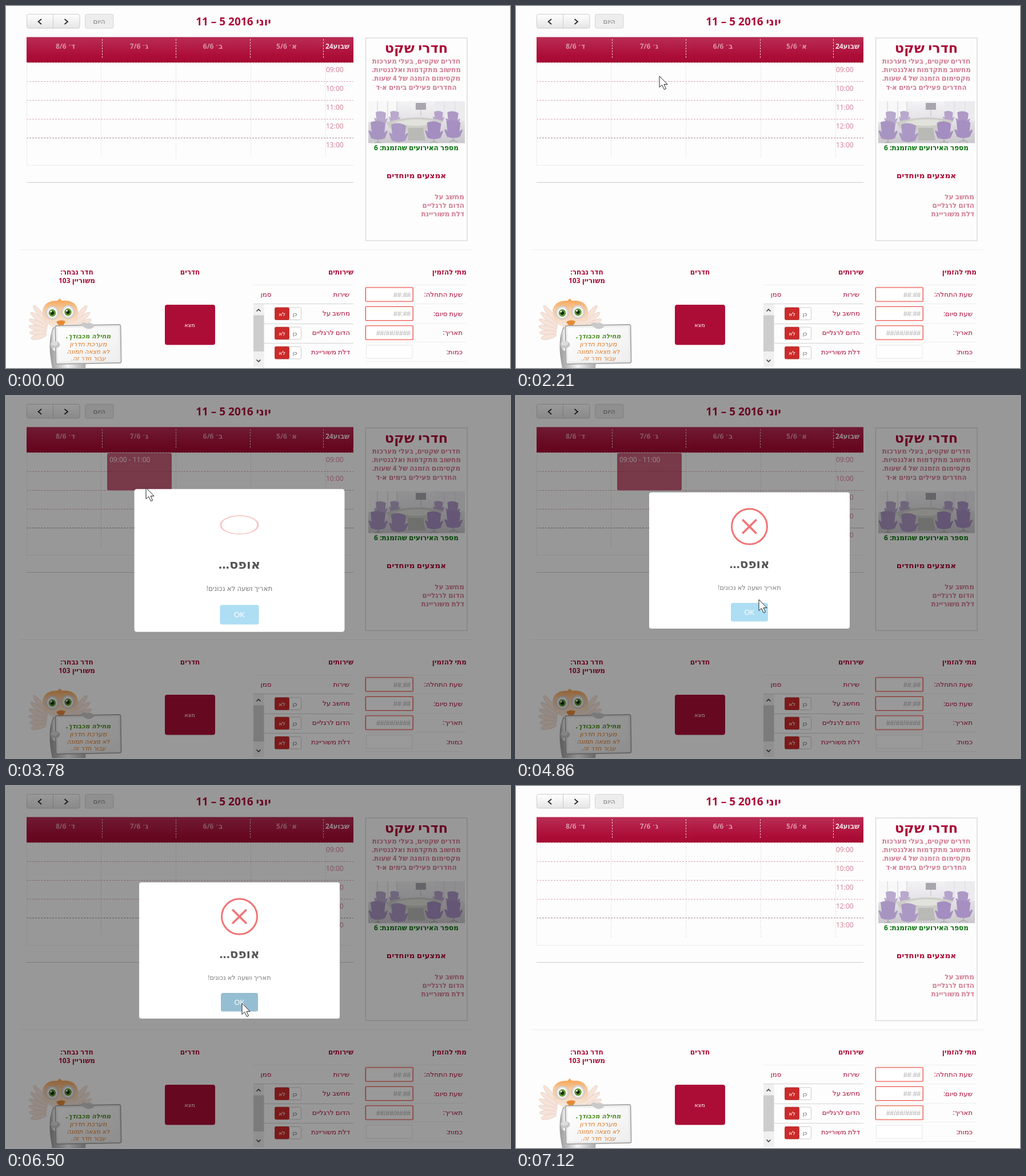
An HTML page for the animation above (8450 ms loop, 882 by 635 pixels).

```html
<!DOCTYPE html>
<html lang="he">
<head>
<meta charset="utf-8">
<title>הזמנת חדרים</title>
<style>
  html, body { margin: 0; width: 100%; height: 100%; overflow: hidden; background: #fdfdfd; }
  svg { display: block; width: 100%; height: 100%; }
  text { font-family: "Open Sans", "Noto Sans", "DejaVu Sans", sans-serif; direction: rtl; text-anchor: middle; }
  .bold { font-weight: 700; }
  .right { text-anchor: start; }
  .ltr { direction: ltr; text-anchor: start; }
  .hint { direction: ltr; text-anchor: end; font-family: "Liberation Sans", sans-serif; }
  .latin { direction: ltr; font-family: "Liberation Sans", sans-serif; }
  .hand { font-family: "DejaVu Sans", sans-serif; font-style: italic; }
</style>
</head>
<body>
<svg id="stage" viewBox="0 0 882 635">
  <defs>
    <linearGradient id="head" x2="0" y2="1"><stop stop-color="#b92d54"/><stop offset=".75" stop-color="#ac0d37"/><stop offset="1" stop-color="#a50a33"/></linearGradient>
    <linearGradient id="button" x2="0" y2="1"><stop stop-color="#fff"/><stop offset="1" stop-color="#e5e5e5"/></linearGradient>
    <linearGradient id="wall" x2="0" y2="1"><stop stop-color="#f3f2f4"/><stop offset=".5" stop-color="#e2e0e4"/><stop offset="1" stop-color="#c9c6cc"/></linearGradient>
    <linearGradient id="plume" x2="0" y2="1"><stop stop-color="#f5a04c"/><stop offset=".35" stop-color="#f8c9a0"/><stop offset="1" stop-color="#f4ebe5"/></linearGradient>
    <linearGradient id="fur"><stop stop-color="#999"/><stop offset=".5" stop-color="#f2f2f2"/><stop offset="1" stop-color="#aaa"/></linearGradient>
    <linearGradient id="board" x2="1" y2="1"><stop stop-color="#fff"/><stop offset="1" stop-color="#eee"/></linearGradient>
    <clipPath id="photo"><path d="M634 167h169v73.500h-169z"/></clipPath>
  </defs>
  <g id="page"></g>
  <g id="event">
    <rect x="177" y="100" width="113" rx="3" fill="#ac0d37" fill-opacity=".66"/>
    <text class="ltr" x="181" y="116" font-size="12" fill="#fbeef1"></text>
  </g>
  <rect id="shade" width="882" height="635"/>
  <g id="modal"></g>
  <path id="cursor" d="M0 0V19.500L4.500 15.500 8.500 23.500 11.500 22 8 14.500H14Z" fill="#fff" stroke="#222"/>
</svg>
<script>
const $ = id => document.getElementById(id);
const RED = '#ac0d37', PINK = '#d27d94';

const text = (x, y, size, fill, str, cls = '') =>
  `<text x="${x}" y="${y}" font-size="${size}" fill="${fill}" class="${cls}">${str}</text>`;
const rect = (x, y, w, h, fill, more = '') =>
  `<rect x="${x}" y="${y}" width="${w}" height="${h}" fill="${fill}" ${more}/>`;
const path = (d, stroke, width = 1, more = '') =>
  `<path d="${d}" fill="none" stroke="${stroke}" stroke-width="${width}" ${more}/>`;
const shape = (d, fill, more = '') => `<path d="${d}" fill="${fill}" ${more}/>`;
const oval = (x, y, rx, ry, fill, more = '') =>
  `<ellipse cx="${x}" cy="${y}" rx="${rx}" ry="${ry}" fill="${fill}" ${more}/>`;
const each = (list, draw) => list.map(draw).join('');

function toolbar() {
  return rect(36.5, 14.5, 92.500, 24.500, 'url(#button)', 'rx="3" stroke="#ccc"') +
    path('M82.500 15V39', '#ccc') +
    path('M62 23L56.500 27.500 62 32M102.500 23L108 27.500 102.500 32', '#222', 1.7) +
    rect(138.5, 14.5, 49.500, 24.500, '#ededed', 'rx="3" stroke="#d6d6d6"') +
    text(163, 31, 11.5, '#777', 'היום') +
    text(398, 34, 19, RED, 'יוני 2016 5 – 11', 'bold');
}

function calendar() {
  const days = [[491, 'א׳ 5/6'], [362, 'ב׳ 6/6'], [233, 'ג׳ 7/6'], [104, 'ד׳ 8/6']];
  return rect(36, 54.5, 572, 44.5, 'url(#head)') +
    path('M168.500 58V93M297.500 58V93M427.500 58V93M555.500 58V93', '#f0cdd6', 1, 'stroke-dasharray="3 2"') +
    text(580, 75, 12, '#f6e3e8', 'שבוע24', 'bold') +
    each(days, ([x, s]) => text(x, 75, 12, '#db93a7', s, 'bold')) +
    path('M36.500 99V265M166.500 99V265M297.500 99V265M428.500 99V265M559.500 99V265', '#ddd', 1, 'stroke-dasharray="2 2"') +
    path('M36 99.500H608M36 132.500H608M36 165.500H608M36 198.500H608', '#dda6b5', 1, 'stroke-dasharray="3 2"') +
    path('M36 231.500H608', '#a58690', 1, 'stroke-dasharray="3 2"') +
    each([9, 10, 11, 12, 13], (h, i) =>
      text(560, 116 + i * 33, 12, PINK, String(h).padStart(2, '0') + ':00', 'ltr')) +
    path('M36.500 99V279.500H608', '#ececec') + path('M36 309.500H608', '#ccc') + path('M25 427.500H818', '#eee');
}

function photo() {
  const chair = ([x, y, s, c]) => `<g transform="translate(${x} ${y}) scale(${s})">` +
    shape('M-13 -14Q0 -20 13 -12L11 5Q15 -1 17 2L12 14Q0 19 -12 14L-17 1Q-13 -1 -11 4Z', c) +
    path('M0 15V23M-8 24L0 20 8 24', '#aaa', 1.5) + '</g>';
  const chairs = [[656, 196, .7, '#b9a9cc'], [680, 194, .6, '#b9a9cc'], [757, 194, .6, '#b5a3cb'], [782, 197, .75, '#ad98c6'],
    [651, 218, 1, '#a894c1'], [687, 222, 1, '#ab98c4'], [749, 218, .95, '#a48dc0'], [783, 216, .95, '#a68fc1']];
  return '<g clip-path="url(#photo)">' + rect(634, 167, 169, 74, 'url(#wall)') +
    shape('M634 167H684V195L634 204Z', '#f8f8f9') + path('M650 167V202M668 167V199M684 167V196', '#dddde0', 1.5) +
    shape('M750 167H803V202L750 192Z', '#ececef') + path('M767 167V194M786 167V198', '#dcdbe0') +
    rect(717, 170, 18, 12, '#aaa6af') + path('M726 182V193', '#bbb') +
    each(chairs.slice(0, 4), chair) +
    shape('M665 204Q718 188 766 202L750 216Q710 224 672 215Z', '#cdcdc9') +
    shape('M680 204Q718 194 752 203L735 209Q705 213 680 204Z', '#e1e2db') +
    shape('M704 214H730L734 236H703Z', '#b9b9b6') +
    each(chairs.slice(4), chair) + '</g>';
}

function sidebar() {
  const about = ['חדרים שקטים, בעלי מערכות', 'מחשוב מתקדמות ואלגנטיות.', 'מקסימום הזמנה של 4 שעות.', 'החדרים פעילים בימים א-ד'];
  const extras = ['מחשב על', 'הדום לרגליים', 'דלת משוריינת'];
  return rect(629.5, 56, 177.5, 355.5, 'none', 'stroke="#d9d9d9" stroke-width="1.4"') +
    text(718, 82, 24, RED, 'חדרי שקט', 'bold') +
    each(about, (s, i) => text(718, 101 + i * 15.2, 12, PINK, s, 'bold')) + photo() +
    text(718, 253, 12, '#08700c', 'מספר האירועים שהזמנת: 6', 'bold') +
    text(718, 301.5, 13.7, RED, 'אמצעים מיוחדים', 'bold') +
    each(extras, (s, i) => text(802, 339 + i * 15.2, 12, PINK, s, 'bold right'));
}

function bookingForm() {
  const rows = [['שעת התחלה:', '##:##'], ['שעת סיום:', '##:##'], ['תאריך:', '##/##/####'], ['כמות:', '']];
  return text(806, 471, 12, RED, 'מתי להזמין', 'bold right') +
    each([489.5, 522.5, 556.5, 589.5, 623.5], y => path(`M629 ${y}H805`, '#eee')) +
    each(rows, ([label, hint], i) => {
      const y = 494 + i * 33.5;
      const field = hint
        ? rect(629, y - .5, 83.500, 25, 'none', 'rx="2" stroke="#f9c4c0" stroke-width="2"') +
          rect(629.5, y, 82.500, 24, '#fff', 'rx="1" stroke="#ee5d55" stroke-width="1.2"')
        : rect(630.5, y + .5, 80.500, 23, '#fff', 'stroke="#e6e6e6"');
      return field + text(799, y + 16, 11.8, RED, label, 'right') + text(708, y + 16.5, 12, '#aaa', hint, 'hint');
    });
}

function services() {
  const rows = ['מחשב על', 'הדום לרגליים', 'דלת משוריינת'];
  return text(608, 471, 12, RED, 'שירותים', 'bold right') +
    text(601, 510, 11.8, RED, 'שירות', 'right') + text(455, 510, 11.8, RED, 'סמן') +
    path('M433 489.500H608', '#eee') + path('M433 522.500H608M452 557.500H608M452 591.500H608', '#d2d2d2') +
    rect(433, 523, 18.5, 110, '#f0f0f0') + rect(433, 542.5, 18.5, 63.5, '#cdcdcd') +
    path('M438.500 535.500L442 532 445.500 535.500M438.500 620.500L442 624 445.500 620.500', '#444', 1.7) +
    each(rows, (s, i) => {
      const y = 529 + i * 34.3;
      return text(602, y + 13.5, 11.8, RED, s, 'right') +
        rect(470.5, y, 46, 21.5, '#fff', 'rx="2" stroke="#ccc"') +
        rect(470.5, y, 25, 21.5, '#cb2a2a', 'rx="2" stroke="#b52a2a" stroke-width=".7"') +
        text(483, y + 14.5, 9.5, '#fff', 'לא') + text(505.5, y + 14.5, 9.5, '#555', 'כן');
    });
}

function mascot() {
  const feather = (x, y, angle, length) =>
    oval(0, -length / 2, 4.2, length / 2, '#f6e3d9', `stroke="#e5cfc4" stroke-width=".8" transform="translate(${x} ${y}) rotate(${angle})"`);
  const wing = side => each([0, 1, 2, 3, 4, 5], i =>
    feather(95 + side * (22 + i * .5), 557 + i * 4, side * (38 + i * 13), 40 - i * 2.5));
  const eye = (x, y) => oval(x, y, 11.5, 12, '#dedad5', 'stroke="#c9b9aa" stroke-width=".8"') +
    oval(x, y, 8.5, 9, '#f8f8f6') + oval(x, y + .5, 6.200, 6.500, '#5d9635') + oval(x, y + .5, 3, 3.3, '#16240e') + oval(x - 2, y - 2, 1.5, 1.5, '#fff');
  const lines = [[583, 12.5, 'מחילה מכבודך.', '#4e8f22', 'hand bold'], [597, 13, 'מערכת חדרון', '#e07a28', 'hand'],
    [609.5, 12, 'לא מצאה תמונה', '#e07a28', 'hand'], [622, 12, 'עבור חדר זה.', '#e07a28', 'hand']];
  return wing(-1) + wing(1) +
    shape('M84 560Q70 588 82 640H138Q146 600 118 560Z', 'url(#fur)') +
    shape('M64 534Q68 516 90 517L94 513 98 517Q122 515 126 534Q129 563 96 566Q64 563 64 534Z', 'url(#plume)') +
    eye(81, 538) + eye(108.5, 536.5) +
    shape('M88 554Q96 549 104 553Q101 561 96.500 563Q91 560 88 554Z', '#e58a35') +
    shape('M87 562Q77 572 77 590Q76 603 88 606L92 590Z', 'url(#fur)') +
    `<g transform="rotate(-1 143 593)">` +
    rect(87, 560, 114, 67, 'url(#board)', 'rx="3" stroke="#aaa" stroke-width="2"') +
    rect(90, 563, 108, 61, 'none', 'rx="2" stroke="#e4e4e4"') + '</g>' +
    oval(86, 594, 8.5, 6, '#c5c5c5') + oval(85, 592, 6, 4, '#ddd') +
    shape('M130 559Q136 552 142 557Q152 553 154 563Q146 569 139 565Z', '#c9c9c9') +
    each(lines, ([y, size, s, fill, cls]) => text(144, y, size * .88, fill, s, cls));
}

$('page').innerHTML = toolbar() + calendar() + sidebar() + bookingForm() + services() +
  text(322, 471, 12, RED, 'חדרים', 'bold') + rect(278, 524, 88, 70.500, RED, 'rx="4"') + text(321.5, 563, 9.5, '#fff', 'מצא') +
  text(124, 471, 12, RED, 'חדר נבחר:', 'bold') + text(124, 486, 12, RED, 'משוריין 103', 'bold') + mascot();

$('modal').innerHTML = rect(-175.5, -119.5, 351, 239, '#fff', 'rx="4"') +
  `<g id="icon"><circle r="31" fill="none" stroke="#f27474" stroke-width="3"/>` +
  path('M-12.300 -12.300L12.300 12.300M12.300 -12.300L-12.300 12.300', '#f27474', 3.6, 'id="cross"') + '</g>' +
  text(0, 13.5, 21.5, '#575757', 'אופס...', 'bold') + text(0, 51.5, 11.4, '#797979', 'תאריך ושעה לא נכונים!') +
  rect(-32.5, 74.5, 65, 32.5, '#aedef4', 'rx="3.5" id="ok"') + text(0, 95, 12.5, '#fff', 'OK', 'latin');

const clamp = v => Math.max(0, Math.min(1, v));
const mix = (a, b, p) => a + (b - a) * p;

// CSS "ease" timing, solved by bisection.
function ease(p) {
  let lo = 0, hi = 1;
  for (let i = 0; i < 20; i++) {
    const u = (lo + hi) / 2;
    if (.75 * u * (1 - u) + u ** 3 < p) lo = u; else hi = u;
  }
  return .3 * lo * (1 - lo) ** 2 + 3 * lo * lo * (1 - lo) + lo ** 3;
}

// Value at p along [position, value] stops.
function along(p, stops, curve = v => v) {
  if (p <= stops[0][0]) return stops[0][1];
  for (let i = 1; i < stops.length; i++) {
    const [p0, a] = stops[i - 1], [p1, b] = stops[i];
    if (p < p1) return mix(a, b, curve((p - p0) / (p1 - p0)));
  }
  return stops[stops.length - 1][1];
}

// The screen refreshes only inside these bursts: start, end, intervals.
const LOOP = 8450;
const bursts = [[0, 0, 1], [210, 990, 10], [1070, 1890, 11], [1980, 2210, 3], [2760, 3070, 4], [3680, 3780, 1],
  [3870, 4470, 8], [4580, 4860, 4], [4950, 5400, 6], [5490, 5580, 1], [6320, 6500, 1], [6570, 7120, 7]];
function refreshTime(t) {
  const [start, end, count] = bursts.filter(b => b[0] <= t).pop();
  const step = (end - start) / count;
  return step ? Math.min(end, start + Math.floor((t - start) / step + 1e-6) * step) : start;
}

const route = [[210, 785, 601], [450, 640, 470], [700, 430, 300], [990, 310, 218], [1200, 333, 165], [1480, 300, 90],
  [1650, 262, 88], [1780, 242, 104], [1890, 245, 116], [2210, 251, 123], [2700, 251, 123], [3070, 245, 161],
  [4000, 245, 161], [4470, 262, 250], [4860, 425, 357], [5150, 418, 388], [5400, 404, 375], [5580, 413, 381]];
const routeX = route.map(([t, x]) => [t, x]), routeY = route.map(([t, , y]) => [t, y]);

function draw(now) {
  const t = refreshTime(now);
  const show = (id, on) => $(id).setAttribute('display', on ? 'inline' : 'none');
  const place = (id, value) => $(id).setAttribute('transform', value);
  const x = along(t, routeX), y = along(t, routeY);

  show('cursor', t >= 210 && t < 7119);
  place('cursor', `translate(${x} ${y})`);

  const hours = y < 132 ? 1 : 2;
  show('event', t >= 2760 && t < 6320);
  $('event').children[0].setAttribute('height', hours * 33 - .5);
  $('event').children[1].textContent = `09:00 - ${9 + hours}:00`;

  const fade = 1 - clamp((t - 6520) / 500);
  $('shade').setAttribute('opacity', .4 * clamp((t - 3680) / 100) * fade);

  const age = (t - 3680) * 1.12 + 10, leaving = (t - 6520) / 200;
  const scale = leaving > 0 && leaving < 1 ? mix(1, .5, ease(leaving))
    : along(age / 300, [[0, .7], [.45, 1.05], [.8, .95], [1, 1]], ease);
  show('modal', t >= 3680 && fade > 0);
  $('modal').setAttribute('opacity', fade);
  place('modal', `translate(408.5 288.5) scale(${scale})`);

  const turn = ease(clamp(age / 500)), p = age / 500;
  $('icon').setAttribute('opacity', turn);
  place('icon', `translate(0 -59.5) scale(1 ${Math.max(0, Math.cos((1 - turn) * Math.PI / 1.8))})`);
  const drop = along(p, [[.5, 19], [.8, -4.4], [1, 0]], ease);
  place('cross', `translate(0 ${drop}) scale(${along(p, [[.5, .4], [.8, 1.15], [1, 1]], ease)})`);
  $('cross').setAttribute('opacity', along(p, [[.5, 0], [1, 1]], ease));

  const hover = t > 4500 && x > 376 && x < 441 && y > 363 && y < 395;
  $('ok').setAttribute('fill', t >= 6320 && t <= 6500 ? '#96bed2' : hover ? '#a1d9f2' : '#aedef4');
}

function tick() {
  draw(performance.now() % LOOP);
  requestAnimationFrame(tick);
}
tick();
</script>
</body>
</html>
```
